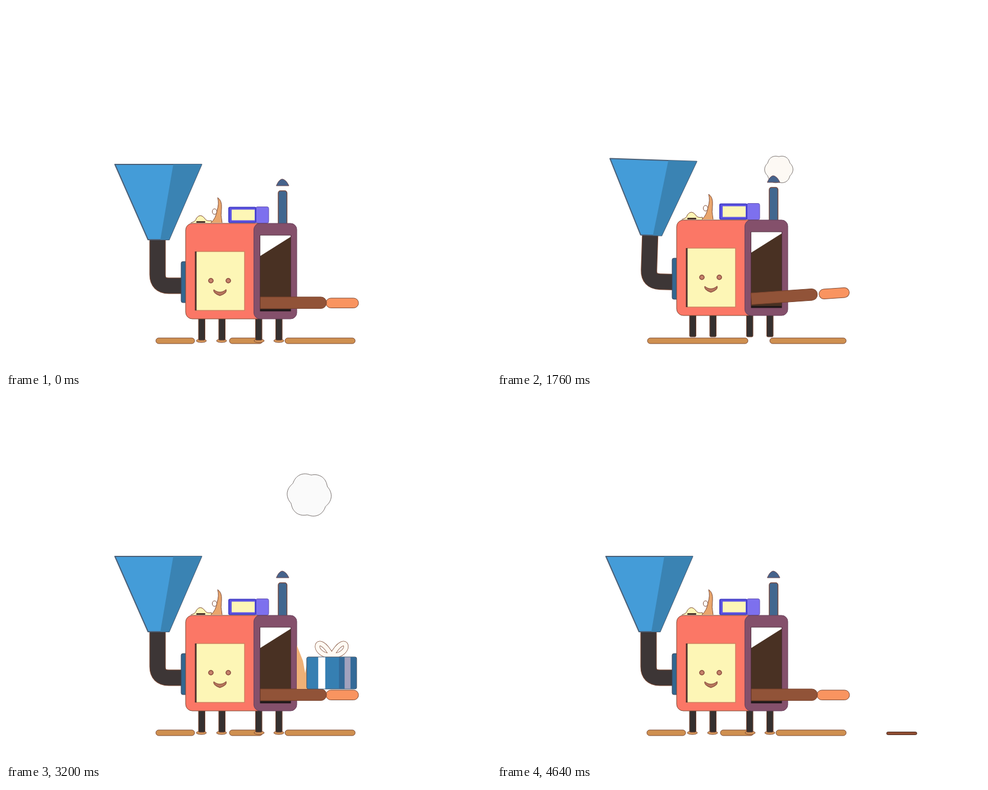
An HTML page with a canvas for the animation above (4.72 s loop, 864x648 px).

```html
<!DOCTYPE html>
<html lang="en">
<head>
<meta charset="utf-8">
<title>Gift machine</title>
<style>
html, body { margin: 0; width: 100%; height: 100%; overflow: hidden; background: #fff; }
canvas { display: block; }
</style>
</head>
<body>
<canvas id="stage" width="864" height="648"></canvas>
<script>
const ctx = document.getElementById('stage').getContext('2d');
const LOOP = 4720, STEP = 80, RAD = Math.PI / 180;
const EDGE = '#7d4a35', CREAM = '#fdf6b6';

const clamp = v => Math.max(0, Math.min(1, v));
const span = (t, a, b) => clamp((t - a) / (b - a));
const mix = (a, b, k) => a + (b - a) * k;

function paint(fill, line, width = 1) {
  if (fill) { ctx.fillStyle = fill; ctx.fill(); }
  if (line) { ctx.strokeStyle = line; ctx.lineWidth = width; ctx.stroke(); }
}
function box(x, y, w, h, r, fill, line, width) {
  ctx.beginPath();
  ctx.roundRect(x, y, w, h, r);
  paint(fill, line, width);
}
function poly(points, fill, line, width) {
  ctx.beginPath();
  points.forEach(p => ctx.lineTo(p[0], p[1]));
  ctx.closePath();
  paint(fill, line, width);
}
function oval(x, y, rx, ry, fill, line, width) {
  ctx.beginPath();
  ctx.ellipse(x, y, rx, ry, 0, 0, 7);
  paint(fill, line, width);
}
function group(draw) { ctx.save(); draw(); ctx.restore(); }
function turn(x, y, deg) {
  ctx.translate(x, y);
  ctx.rotate(deg * RAD);
  ctx.translate(-x, -y);
}

// Shaking starts gently, then grows into full hops.
function shake(t) {
  if (t < 880 || t >= 2560) return 0;
  return -Math.sin(Math.PI * (t - 1280) / 320) * (t < 1280 ? 0.45 : 1);
}

function ground(t, hop) {
  const strip = (a, b) => box(a, 591, b - a, 10, 5, '#cf9050', EDGE);
  if (hop > 0.5) strip(268, 447);
  else { strip(267, 336); strip(398, 457); }
  strip(hop > 0.5 ? 486 : 497, 622);
  if (hop < 0.3) {
    [348, 384, 451, 486].forEach(x => oval(x, 596, 9, 3, '#d99a5c', EDGE));
  }
  if (t >= 3600) box(694, 594.5, 54, 5, 2.5, '#8f4d32', '#4a2a20');
}

function funnel(s) {
  group(() => {
    ctx.translate(0, -7.5 * Math.abs(s));
    turn(285, 500, 1.9 * s);
    ctx.beginPath();
    ctx.moveTo(270, 413);
    ctx.lineTo(270, 478);
    ctx.quadraticCurveTo(270, 498, 290, 498);
    ctx.lineTo(316, 498);
    paint(null, EDGE, 29);
    paint(null, '#3d3636', 27);
    poly([[194, 282], [348.5, 282], [290.5, 416], [253, 416]], '#449cd8', '#4b6078', 2);
    poly([[298, 282], [348.5, 282], [290.5, 416], [275, 416]], '#3a83b3');
  });
}

function trinkets() {
  ctx.beginPath();
  ctx.moveTo(329, 386);
  ctx.quadraticCurveTo(338, 384, 339, 378);
  ctx.quadraticCurveTo(346, 368, 354, 378);
  ctx.quadraticCurveTo(357, 384, 366, 382);
  ctx.lineTo(366, 386);
  paint(CREAM, EDGE);
  box(339, 383, 16, 3, 1, '#4a342b');
  ctx.beginPath();
  ctx.moveTo(365, 386);
  ctx.quadraticCurveTo(374, 378, 376, 364);
  ctx.quadraticCurveTo(380, 352, 377, 341);
  ctx.quadraticCurveTo(385, 346, 384, 360);
  ctx.quadraticCurveTo(382, 372, 385, 386);
  paint('#e9a66d', EDGE);
  oval(371.5, 366, 4, 5, '#fff', EDGE);
  box(445, 357.5, 23, 29, 3, '#7d70ee', '#6654b4');
  box(397, 358.5, 48, 27, 2, '#5c53e4', '#4540c8', 2);
  box(402, 362.5, 41, 19, 0, CREAM);
}

function body() {
  [343, 379, 444.5, 480.5].forEach(x => box(x, 554, 11.5, 41, 2, '#35302f', EDGE));
  box(312, 455, 12, 73, 3, '#326790', '#3e4358');
  trinkets();
  box(485, 329, 15.5, 62, [4, 4, 0, 0], '#41678f', '#764a40', 1.5);
  box(320, 387, 140, 170, 12, '#fb7766', EDGE);
  box(441.5, 387, 76.5, 170, 11, '#84506b', '#68405b');
  box(452.5, 408, 55, 135.5, 0, '#fff', '#50303f');
  poly([[453, 445], [507, 411], [507, 543], [453, 543]], '#493123');
  box(453, 540, 54, 3, 0, '#20191a');
  box(338, 437, 87, 105, 0, CREAM, '#d18261', 1.5);
  box(336.5, 437, 3, 105, 0, '#4c302c');
  [365, 396].forEach(x => oval(x, 489, 4, 3.8, '#c7826b', '#8d5042', 1.7));
  ctx.beginPath();
  ctx.moveTo(370, 505);
  ctx.quadraticCurveTo(381, 514, 392, 505);
  ctx.quadraticCurveTo(394, 511, 381, 515.5);
  ctx.quadraticCurveTo(369, 511, 370, 505);
  paint('#b9775c', '#935a48', 1.5);
}

function cap() {
  ctx.beginPath();
  ctx.moveTo(481.5, 320);
  ctx.quadraticCurveTo(486, 309, 492, 308);
  ctx.quadraticCurveTo(499, 309, 504, 320);
  ctx.closePath();
  paint('#46638c', '#704c50');
}

function tray(t, s) {
  group(() => {
    turn(453, 528, -4 * s);
    ctx.translate(0, -Math.abs(s));
    if (t < 3680 || t >= 3840) {
      box(570 + 4 * Math.abs(s), 520, 58 - 4 * Math.abs(s), 17.5, 9, '#f99460', EDGE);
    }
    box(453, 518, 118, 20.5, [0, 10, 10, 0], '#915338', '#76412b');
  });
}

function bow() {
  const loops = (color, width) => {
    ctx.beginPath();
    [-1, 1].forEach(k => {
      ctx.moveTo(0, -31);
      ctx.bezierCurveTo(k * 40, -32, k * 27, -80, 0, -31);
    });
    paint(null, color, width);
  };
  loops(EDGE, 9);
  loops('#fffaf3', 7.5);
}

function gift(t) {
  if (t < 1800 || t >= 4640) return;
  let x = 501.5 + 0.123 * (t - 2560), y = 490, angle = 0;
  if (t > 3360) {
    const k = (t - 3360) / 320, land = span(t, 3680, 3920);
    x = mix(mix(600, 664, Math.min(k, 1)), 721, land);
    y = mix(490 + 37 * Math.min(k, 1) ** 2, 552, land);
    angle = mix(31 * Math.min(k, 1) ** 1.5, 90, land);
  }
  // Warm glow left between the machine and the departing gift.
  if (t > 3040 && t <= 3360) {
    poly([[518, 440], [529, 468], [533, 490], [537, 465], [537, 518], [518, 518]], '#efb076');
  }
  const size = 1 - span(t, 4400, 4640);
  group(() => {
    ctx.beginPath();
    ctx.rect(453, 0, 411, 648);
    ctx.clip();
    ctx.translate(x, mix(597, y, size));
    ctx.scale(size, size);
    ctx.rotate(angle * RAD);
    bow();
    box(-44.5, -29, 89, 57, 3, '#367fb2', '#4b5361');
    box(13, -28.5, 31, 56, [0, 3, 3, 0], '#336a98');
    box(-24, -28.5, 12.5, 56, 0, '#fff');
    box(23, -28.5, 10.5, 56, 0, '#a2a2bd');
  });
}

function smoke(t) {
  if (t <= 1440 || t >= 3680) return;
  const u = t - 1760;
  const r = u < 0 ? 25 * (t - 1440) / 320 : 25 + 0.0097 * u;
  const x = 502 + 0.0265 * u;
  const y = u < 0 ? mix(310, 291, (t - 1440) / 320)
                  : 266 - 0.084 * u - 0.0000055 * u * u + r;
  ctx.beginPath();
  for (let i = 0; i < 90; i++) {
    const a = i * 4 * RAD;
    const d = r * (0.91 + 0.1 * Math.abs(Math.cos(3 * a + u / 500)));
    ctx.lineTo(x + d * Math.cos(a), y + d * Math.sin(a));
  }
  ctx.closePath();
  paint(u < 300 ? '#fdf9f4' : '#fafafa', '#77706e');
}

function drop(t) {
  if (t < 160 || t >= 720) return;
  const fall = Math.max(0, t - 240) / 320;
  const r = 14 * span(t, 80, 240);
  oval(270, 56 + 197 * fall * fall, r, r, CREAM, EDGE);
}

function draw(t) {
  const s = shake(t), hop = Math.abs(s);
  ctx.fillStyle = '#fff';
  ctx.fillRect(0, 0, 864, 648);
  ground(t, hop);
  drop(t);
  funnel(s);
  smoke(t);
  group(() => {
    ctx.translate(0, -6 * hop);
    cap();
    body();
    tray(t, s);
  });
  gift(t);
}

ctx.lineJoin = 'round';
const start = performance.now();
function frame() {
  const t = Math.max(0, performance.now() - start) % LOOP;
  draw(Math.floor(t / STEP) * STEP);
  requestAnimationFrame(frame);
}
frame();
</script>
</body>
</html>
```
